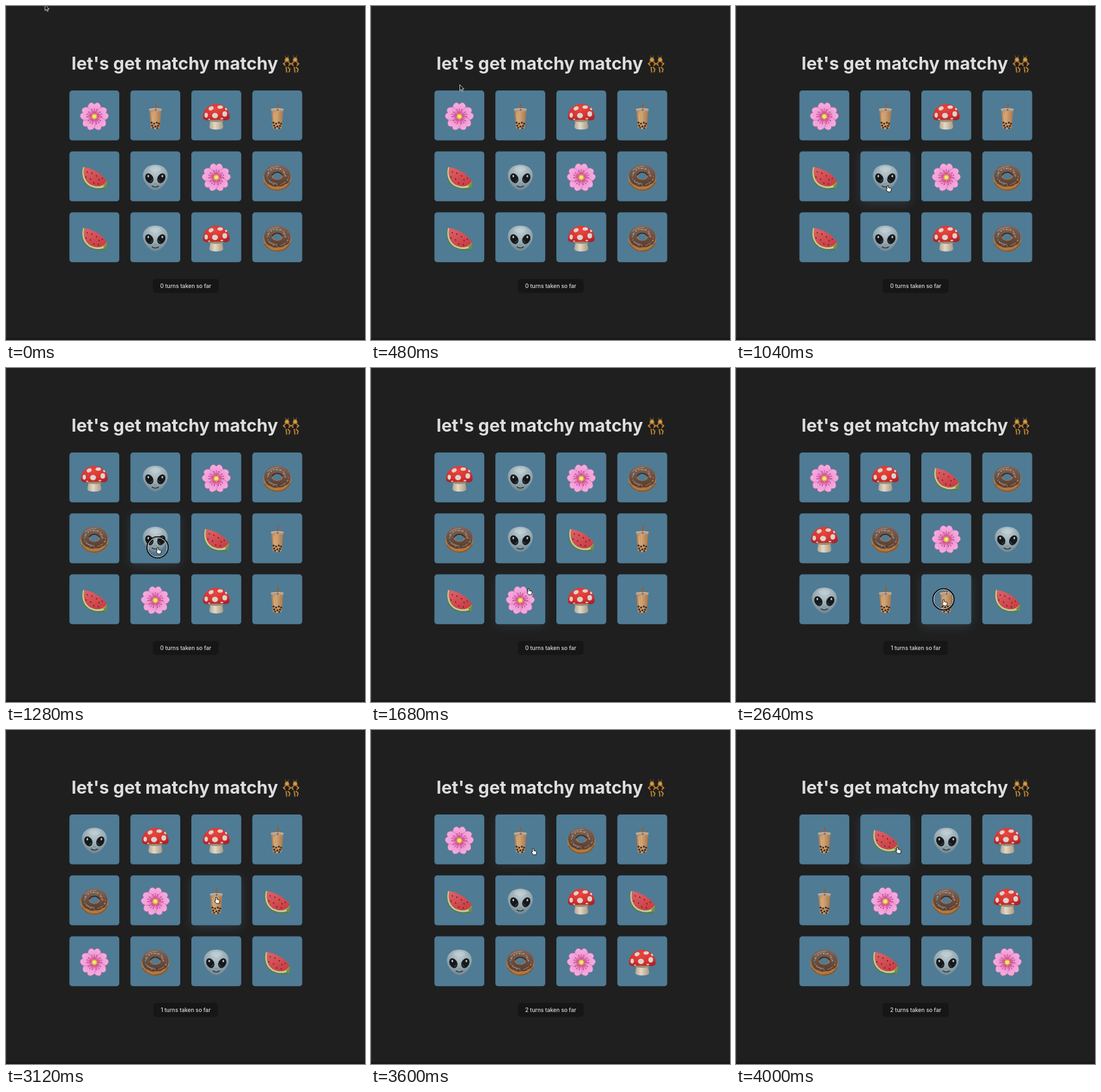
An HTML page for the animation above (4.08 s loop, 552 by 514 pixels).

```html
<!DOCTYPE html>
<html lang="en">
<head>
<meta charset="utf-8">
<title>matchy matchy</title>
<style>
  html, body { margin: 0; width: 100%; height: 100%; overflow: hidden; background: #1f1f1f; }
  svg { display: block; }
  text { font-family: Inter, sans-serif; }
</style>
</head>
<body>
<svg id="stage" width="552" height="514" viewBox="0 0 552 514">
  <defs>
    <filter id="blur" x="-50%" y="-50%" width="200%" height="200%"><feGaussianBlur stdDeviation="8"/></filter>
    <radialGradient id="petalFill" gradientUnits="userSpaceOnUse" cx="0" cy="0" r="22">
      <stop offset=".2" stop-color="#d9529f"/><stop offset=".5" stop-color="#f09ad4"/><stop offset="1" stop-color="#f5b0e0"/>
    </radialGradient>
    <radialGradient id="capFill" cx=".45" cy=".3" r=".75">
      <stop offset="0" stop-color="#e8473f"/><stop offset=".65" stop-color="#d5322f"/><stop offset="1" stop-color="#a92326"/>
    </radialGradient>
    <linearGradient id="stemFill">
      <stop offset="0" stop-color="#b3a48d"/><stop offset=".4" stop-color="#e3d8c6"/><stop offset="1" stop-color="#aa9a82"/>
    </linearGradient>
    <linearGradient id="teaFill">
      <stop offset="0" stop-color="#a97a4d"/><stop offset=".4" stop-color="#d3a676"/><stop offset="1" stop-color="#a97648"/>
    </linearGradient>
    <radialGradient id="skinFill" cx=".5" cy=".25" r=".75">
      <stop offset="0" stop-color="#bccbd0"/><stop offset=".55" stop-color="#98abb3"/><stop offset="1" stop-color="#6f838c"/>
    </radialGradient>
    <linearGradient id="fleshFill" x1="0" y1="0" x2=".5" y2="1">
      <stop offset="0" stop-color="#dd6468"/><stop offset="1" stop-color="#cb3f46"/>
    </linearGradient>
    <linearGradient id="icingFill" x1="0" y1="0" x2="0" y2="1">
      <stop offset="0" stop-color="#80655a"/><stop offset="1" stop-color="#553a30"/>
    </linearGradient>

    <g id="petal">
      <path d="M0-2C-9-6-13.5-14-7-20.5Q-3-22.8 0-18.6Q3-22.8 7-20.5C13.5-14 9-6 0-2Z" fill="url(#petalFill)" stroke="#cf69ab" stroke-width=".6"/>
      <path d="M0-4V-10M-1-4-3.2-10M1-4 3.2-10" stroke="#c03b87" stroke-width=".7"/>
      <path d="M0-11.7v.1M-3.8-10.7v.1M3.8-10.7v.1" stroke="#a3286c" stroke-width="1.5" stroke-linecap="round"/>
    </g>
    <g id="f">
      <g id="petals"></g>
      <circle r="4.9" fill="#d0a03e"/><circle r="3" fill="#f3e27c"/>
    </g>

    <g id="b">
      <path d="M.2-10 1.2-19.3" stroke="#985c3a" stroke-width="2.4" stroke-linecap="round"/>
      <path d="M-9.3-10.5H9.3L6.8 18Q0 21-6.8 18Z" fill="url(#teaFill)"/>
      <path d="M-9.8-11.8Q0-14 9.8-11.8L9.3-8.5Q0-6.7-9.3-8.5Z" fill="#b59c85"/>
      <path d="M-9.4-11.2Q0-13.2 9.4-11.2" fill="none" stroke="#d3c4b4"/>
      <path d="M.8-12 .5-9" stroke="#985c3a" stroke-width="2"/>
      <path d="M-5.5-6-4.2 8" stroke="#e2c197" stroke-width="1.3" opacity=".7"/>
      <g fill="#3d2a21">
        <circle cx="-5.8" cy="9.5" r="1.5"/><circle cx="-1.8" cy="11" r="1.5"/><circle cx="2.4" cy="9.5" r="1.5"/><circle cx="5.8" cy="11" r="1.5"/>
        <circle cx="-4.7" cy="14" r="1.6"/><circle cx="0" cy="15.2" r="1.6"/><circle cx="4.2" cy="14.4" r="1.6"/>
        <circle cx="-3.3" cy="17.4" r="1.4"/><circle cx="2.9" cy="17.8" r="1.4"/>
      </g>
    </g>

    <g id="m">
      <path d="M-9 3Q-9 9-10.5 14Q-11.5 18.5-7 19.5Q0 21 7 19.5Q11.5 18.5 10.5 14Q9 9 9 3Z" fill="url(#stemFill)"/>
      <path d="M-13 4Q0-1 13 4L10 7.5Q0 9.5-10 7.5Z" fill="#9c8970"/>
      <path d="M-20.5 1C-20.5-11-11-19.3 0-19.3S20.5-11 20.5 1Q20.5 5.5 14 6Q0 4-14 6Q-20.5 5.5-20.5 1Z" fill="url(#capFill)"/>
      <g fill="#ddd3cd">
        <ellipse cx="-2" cy="-1.5" rx="4.6" ry="4.2"/><ellipse cx="-8" cy="-12.5" rx="4" ry="2.9" transform="rotate(-30 -8 -12.5)"/>
        <ellipse cx="6" cy="-14.5" rx="4.2" ry="2.6"/><ellipse cx="13" cy="-4" rx="3.6" ry="4.2"/>
        <ellipse cx="-15.5" cy="-2" rx="2.6" ry="3.8"/><ellipse cx="15" cy="-11.5" rx="1.4" ry="2" transform="rotate(-35 15 -11.5)"/>
        <ellipse cx="8.5" cy="3.3" rx="2.2" ry="1.1"/><ellipse cx="-11" cy="4.2" rx="1.8" ry=".9"/>
      </g>
    </g>

    <g id="w">
      <path d="M-18-16.3C-21.5-4-18.5 8-9 14C-1 18.8 10 19.6 17 17.5Q20.5 13 19.8 5.5Z" fill="#557d40"/>
      <path d="M-17.3-16.3C-20.5-4-17 7-8 12.6C0 17 9 17.5 15 15Q18 11.5 19.4 6Z" fill="#c3cc98"/>
      <path d="M-15.5-16.2C-18-5-15 5-7 10.3C0 14.2 8 14.8 13 12Q17 9.5 19.3 5.8Q9-11-15.5-16.2Z" fill="url(#fleshFill)"/>
      <path d="M13.5 13Q17.5 10 19.8 5.5Q20.5 13 17 17.5Z" fill="#6d9049"/>
      <path d="M-11-9l.4 1M-13-1l.5 1M-4-7l.5 1M-6 2l.5 1M3-3l.5 1M-1 8l.5 1M7 3l.5 1M12 1l.4.8M6 9.5l.5 1" stroke="#4b262a" stroke-width="1.4" stroke-linecap="round"/>
    </g>

    <g id="a">
      <path d="M0-19.5C12-19.5 19.2-12 19.2-3C19.2 8 7 20 0 20S-19.2 8-19.2-3C-19.2-12-12-19.5 0-19.5Z" fill="url(#skinFill)"/>
      <ellipse cx="0" cy="-13" rx="9" ry="4" fill="#d4e0e3" opacity=".3"/>
      <g id="eye">
        <ellipse cx="-9.2" cy="1.2" rx="5.8" ry="8" fill="#16191c" transform="rotate(-28 -9.2 1.2)"/>
        <ellipse cx="-10.8" cy="-2" rx="1.3" ry="1.8" fill="#c3cdd2"/>
        <path d="M-8 6.5Q-5 5.5-4.6 3" fill="none" stroke="#5b686f" stroke-width=".8"/>
      </g>
      <use href="#eye" transform="scale(-1 1)"/>
      <path d="M-1.2 9v1M1.2 9v1" stroke="#56676f" stroke-width=".9"/>
      <path d="M-5 13Q0 16.5 5 13" fill="none" stroke="#2b353b" stroke-width="1.3" stroke-linecap="round"/>
    </g>

    <g id="d">
      <path fill-rule="evenodd" d="M-21.5.5a21.5 20 0 1 0 43 0a21.5 20 0 1 0-43 0ZM-6.8-2a6.8 5 0 1 0 13.6 0a6.8 5 0 1 0-13.6 0Z" fill="#b0793f"/>
      <path d="M-20 8Q-12 20 0 19.5Q14 19 20 7" fill="none" stroke="#85552b" stroke-width="1.6"/>
      <path fill-rule="evenodd" d="M-20.5-2C-20-13-11-19.5 0-19.5S20-13 20.5-2C20 6 17 10 12 10.5Q8 14.5 2 13.5Q-5 15.5-10 12Q-19 10-20.5-2ZM-8.6-2.6a8.6 6.2 0 1 0 17.2 0a8.6 6.2 0 1 0-17.2 0Z" fill="url(#icingFill)"/>
      <path d="M-8.4-3Q-5.5-8 0-8T8.4-3" fill="none" stroke="#3c2820" stroke-width="1.8"/>
      <path d="M-15-11Q-7-17.5 3-17M-13 5Q-8 9 0 9.5" fill="none" stroke="#b59a8e" stroke-width="1.4" opacity=".6"/>
      <g id="sprinkles" stroke-width="1.3" stroke-linecap="round"></g>
    </g>

    <g id="dancer" fill="none" stroke-linecap="round" stroke-linejoin="round">
      <path d="M-1.6-8.5-2.4-11.3M1.2-8.5 2-11.3" stroke="#5b4935" stroke-width="1.3"/>
      <path d="M-3.4-1.8Q-4-9.6 0-9.6T3.4-1.8Z" fill="#a06a2e"/>
      <circle cy="-5.8" r="2.3" fill="#d59f45"/>
      <path d="M-2-2-5.2-.2-2.4 2.4M2-2 5.2-.2 2.4 2.4" stroke="#c48a38" stroke-width="1.5"/>
      <path d="M-2.2-2.3H2.2L1.5 1 2.7 4.6H-2.7L-1.5 1Z" fill="#1d1813" stroke="#4a3823" stroke-width=".4"/>
      <path d="M-1.2 5-.4 11.8M1.6 5 4.2 7.8 3 11.5" stroke="#b98335" stroke-width="1.7"/>
    </g>

    <path id="arrow" d="M0 0V9.2L2.1 7.3 3.5 10.4 5 9.7 3.6 6.7H6.4Z" fill="#111" stroke="#eee" stroke-width=".8"/>
    <path id="hand" d="M-.8.8Q.2-.2 1.2.8L1.6 3.8 4.8 4.4Q5.9 4.8 5.7 6.3L4.9 10H.6L-2 6.9Q-2.4 5.5-.8 5.8Z" fill="#fff" stroke="#111" stroke-width=".9" stroke-linejoin="round"/>
  </defs>

  <rect width="552" height="514" fill="#1f1f1f"/>
  <path d="M.5 0V514" stroke="#303030"/>
  <rect y="511" width="552" height="3" fill="#181818"/>
  <text x="100.8" y="97.8" font-size="27.1" font-weight="700" fill="#dedede">let's get matchy matchy</text>
  <use href="#dancer" transform="translate(432 89) scale(1.08)"/>
  <use href="#dancer" transform="translate(444.6 89) scale(1.08)"/>
  <g id="glows"></g>
  <g id="cards"></g>
  <rect id="pill" y="420" height="21.6" rx="4.2" fill="#161616"/>
  <text id="turns" x="276.3" y="433.9" font-size="8.47" font-weight="500" fill="#dedede" text-anchor="middle"></text>
  <g id="cursor">
    <g id="ring" fill="none"><circle r="15.6" stroke="#080808" stroke-width="3"/><circle r="15" stroke="#fff" stroke-width="1"/></g>
    <use id="pointer"/>
  </g>
</svg>
<script>
const LOOP = 4080, STEP = 80, SIZE = 76.7, PITCH = 93.75, LEFT = 97.5, TOP = 130.1;
const $ = id => document.getElementById(id);

// Every click reshuffles the board; every second click counts a turn.
const boards = ["fbmbwafdwamd", "mafddawbwfmb", "fmwdmdfaabbw", "ammbdfbwfdaw", "fbdbwamwadfm", "bwambfdmdwaf"];
const clicks = [1280, 1920, 2720, 3280, 3760];

// time, x, y of the cursor hotspot
const path = [
  [0, 60, -2], [1040, 233, 276], [1280, 233, 276], [1680, 242, 339], [1840, 236, 352], [2000, 236, 352],
  [2560, 319, 356], [2720, 319, 356], [3120, 323, 257], [3280, 323, 257], [3600, 249, 182], [4000, 248, 180], [4080, 248, 180]
];

const cells = Array.from({ length: 12 }, (_, i) => ({ x: LEFT + i % 4 * PITCH, y: TOP + Math.floor(i / 4) * PITCH }));

const cardRect = ({ x, y }, extra) => `<rect x="${x}" y="${y}" width="${SIZE}" height="${SIZE}" rx="4.4" ${extra}/>`;
$("petals").innerHTML = [0, 72, 144, 216, 288].map(a => `<use href="#petal" transform="rotate(${a})"/>`).join("");
$("sprinkles").innerHTML = Array.from({ length: 30 }, (_, i) => {
  const angle = i * 2.4, r = .6 + .28 * (i * .618 % 1);
  const x = Math.cos(angle) * r * 20, y = Math.sin(angle) * r * 17 - 2.5;
  const color = ["#cfc0b0", "#b9606a", "#6a9a9e", "#bd9450", "#7f9a62"][i % 5];
  return `<path d="M${x} ${y}l${Math.cos(i * 1.7)} ${Math.sin(i * 1.7)}" stroke="${color}"/>`;
}).join("");
$("glows").innerHTML = cells.map(c => cardRect({ x: c.x, y: c.y + 4 }, 'fill="#6f93b4" filter="url(#blur)"')).join("");
$("cards").innerHTML = cells.map(c =>
  cardRect(c, 'fill="#4f7b95"') + `<use transform="translate(${c.x + SIZE / 2} ${c.y + 40})"/>`).join("");
const glows = [...$("glows").children], icons = [...$("cards").querySelectorAll("use")];

function cursorAt(t) {
  const i = Math.max(1, path.findIndex(p => p[0] >= t));
  const [t0, x0, y0] = path[i - 1], [t1, x1, y1] = path[i];
  const u = Math.max(0, (t - t0) / (t1 - t0)), k = u * u * (3 - 2 * u);
  return { x: x0 + (x1 - x0) * k, y: y0 + (y1 - y0) * k };
}

const inside = (p, c) => p.x >= c.x && p.x <= c.x + SIZE && p.y >= c.y && p.y <= c.y + SIZE;

function draw(t) {
  const count = clicks.filter(c => c <= t).length, turns = count >> 1;
  icons.forEach((icon, i) => icon.setAttribute("href", "#" + boards[count][i]));

  // Averaging recent positions fades the hover glow in and out.
  const trail = [0, 1, 2].map(k => cursorAt(Math.max(0, t - k * STEP)));
  glows.forEach((glow, i) => glow.setAttribute("opacity", .2 * trail.filter(p => inside(p, cells[i])).length / 3));

  const width = turns === 1 ? 99 : 101;
  $("pill").setAttribute("x", 276.3 - width / 2);
  $("pill").setAttribute("width", width);
  $("turns").textContent = `${turns} turns taken so far`;

  const p = trail[0];
  $("cursor").setAttribute("transform", `translate(${p.x} ${p.y})`);
  $("pointer").setAttribute("href", cells.some(c => inside(p, c)) ? "#hand" : "#arrow");
  $("ring").setAttribute("visibility", clicks.some(c => t >= c - STEP && t < c + STEP) ? "visible" : "hidden");
}

const start = performance.now();
function tick() {
  const t = (performance.now() - start) % LOOP;
  draw(Math.floor(t / STEP) * STEP);
  requestAnimationFrame(tick);
}
tick();
</script>
</body>
</html>
```
